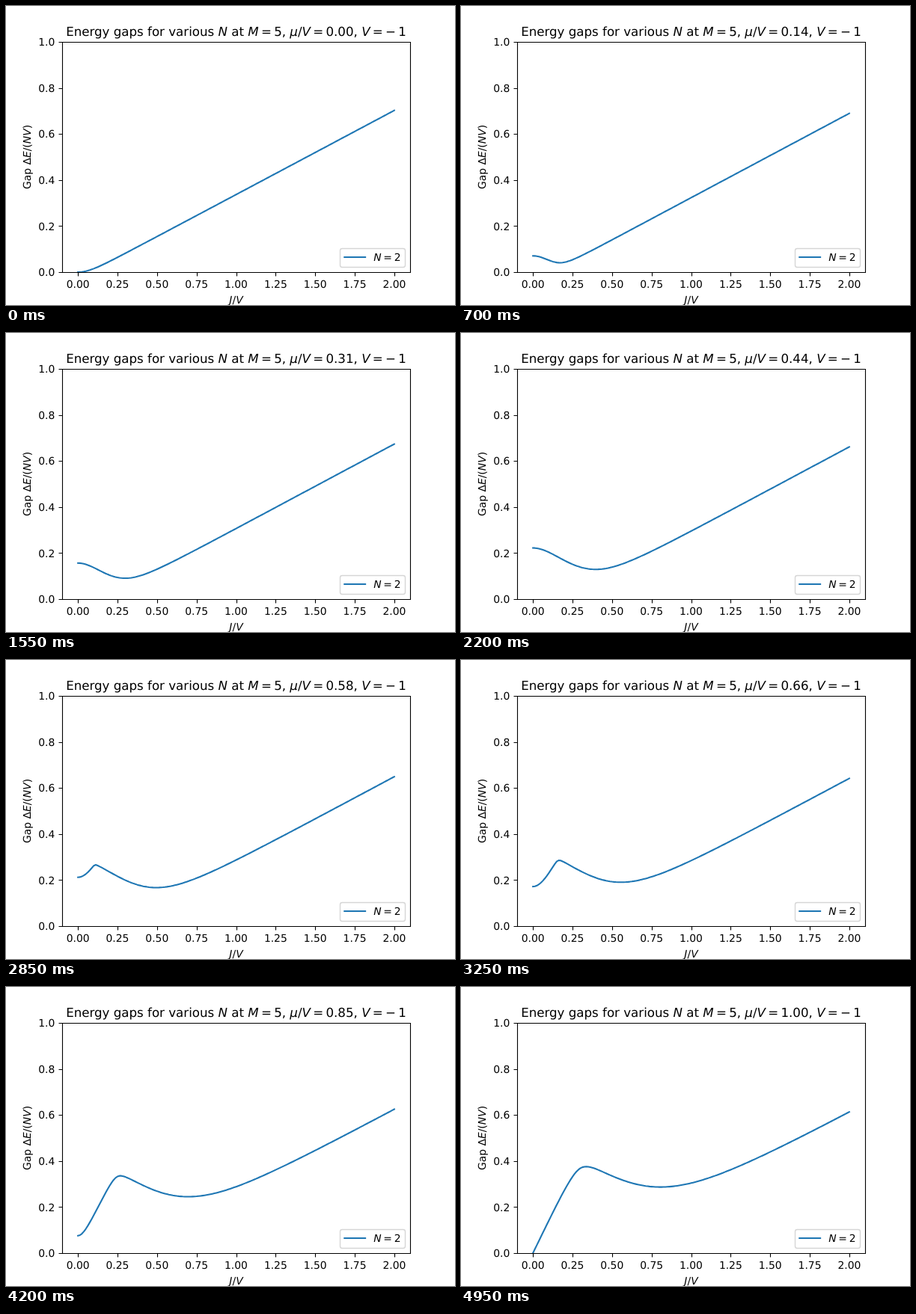
An HTML page that plays this animation: 600x400 px, repeating every 5 s.

```html
<!DOCTYPE html>
<html>
<head>
<meta charset="utf-8">
<style>
html, body { margin: 0; width: 100%; height: 100%; overflow: hidden; background: #fff; }
svg { display: block; font: 13.889px "DejaVu Sans", sans-serif; text-rendering: geometricPrecision; }
#title { font-size: 16.667px; }
.curve { fill: none; stroke: #1f77b4; stroke-width: 2.083; stroke-linecap: square; stroke-linejoin: round; }
.axis { fill: none; stroke: #000; stroke-width: 1.11; }
.mid { text-anchor: middle; }
.end { text-anchor: end; }
</style>
</head>
<body>
<svg id="plot" width="600" height="400" viewBox="0 0 600 400"></svg>
<script>
const SITES = 5, STEPS = 100, STEP_MS = 50, POINTS = 160;
const xOf = j => 75 + 465 * (j + 0.1) / 2.2;
const yOf = gap => 356 - 308 * gap;

// Two bosons on an open chain: hopping J, neighbour attraction 1, end site lowered by mu.
const states = [];
for (let a = 0; a < SITES; a++)
  for (let b = a; b < SITES; b++) states.push([a, b]);

const hop = states.map(([a, b]) => states.map(([c, d]) => {
  const linked = Math.abs(a - c) + Math.abs(b - d) === 1;
  return linked ? (a === b || c === d ? Math.SQRT2 : 1) : 0;
}));

// Number of eigenvalues below e, from the signs of the elimination pivots.
function countBelow(e, J, mu) {
  const n = states.length;
  const m = states.map(([a, b], i) => hop[i].map((h, k) =>
    i === k ? -(b - a === 1) - mu * ((a === 0) + (b === 0)) - e : -J * h));
  let count = 0;
  for (let p = 0; p < n; p++) {
    const pivot = m[p][p] || 1e-12;
    if (pivot < 0) count++;
    for (let r = p + 1; r < n; r++) {
      const f = m[r][p] / pivot;
      if (f) for (let c = p + 1; c < n; c++) m[r][c] -= f * m[p][c];
    }
  }
  return count;
}

function level(k, J, mu) {
  let lo = -12, hi = 0.01;
  for (let i = 0; i < 22; i++) {
    const mid = (lo + hi) / 2;
    if (countBelow(mid, J, mu) > k) hi = mid; else lo = mid;
  }
  return (lo + hi) / 2;
}

function curvePath(mu) {
  const pts = [];
  for (let i = 0; i <= POINTS; i++) {
    const J = 2 * i / POINTS;
    const gap = (level(1, J, mu) - level(0, J, mu)) / 2;
    pts.push(xOf(J).toFixed(2) + "," + yOf(gap).toFixed(2));
  }
  return "M" + pts.join("L");
}

// Math-style text pieces
const it = s => `<tspan font-style="italic">${s}</tspan>`;
const op = s => `<tspan dx="0.195em">${s}</tspan>`;
const eq = (name, value) => it(name) + op("=") + op(value);
const text = (x, y, s, cls = "") => `<text x="${x}" y="${y}" class="${cls}">${s}</text>`;

let ticks = "", labels = "";
for (let i = 0; i <= 8; i++) {
  const x = xOf(i / 4);
  ticks += `M${Math.round(x) + 0.5} 356.5v5`;
  labels += text(x, 377, (i / 4).toFixed(2), "mid");
}
for (let i = 0; i <= 5; i++) {
  const y = yOf(i / 5);
  ticks += `M75.5 ${Math.round(y) + 0.5}h-5`;
  labels += text(65.3, Math.round(y + 5.2), (i / 5).toFixed(1), "end");
}

document.getElementById("plot").innerHTML = `
  <clipPath id="area"><rect x="75" y="48" width="465" height="308"/></clipPath>
  <path id="curve" class="curve" clip-path="url(#area)"/>
  <path class="axis" d="M75.5 48.5H540.5V356.5H75.5Z${ticks}"/>
  ${labels}
  <text id="title" class="mid" x="307.5" y="40"></text>
  ${text(307.5, 398, it("J") + "/" + it("V"), "mid")}
  <g transform="translate(32.5 202) rotate(-90)">
    ${text(0, 0, "Gap Δ" + it("E") + "/(" + it("NV") + ")", "mid")}
  </g>
  <rect x="446.5" y="324.5" width="87" height="25" rx="2.8" fill="#fff" stroke="#ccc" stroke-opacity="0.8" stroke-width="1.39"/>
  <path class="curve" d="M452.3 336H480.1"/>
  ${text(491.2, 340.5, eq("N", "2"))}`;

const curve = document.getElementById("curve");
const title = document.getElementById("title");
const paths = [];
let shown = -1;

function draw() {
  const step = Math.floor(performance.now() / STEP_MS) % STEPS;
  if (step !== shown) {
    shown = step;
    const mu = step / (STEPS - 1);
    paths[step] ??= curvePath(mu);
    curve.setAttribute("d", paths[step]);
    title.innerHTML = `Energy gaps for various ${it("N")} at ${eq("M", "5")}, ` +
      `${it("μ")}/${eq("V", mu.toFixed(2))}, ${eq("V", "−")}${op("1")}`;
  }
  requestAnimationFrame(draw);
}
draw();
</script>
</body>
</html>
```
